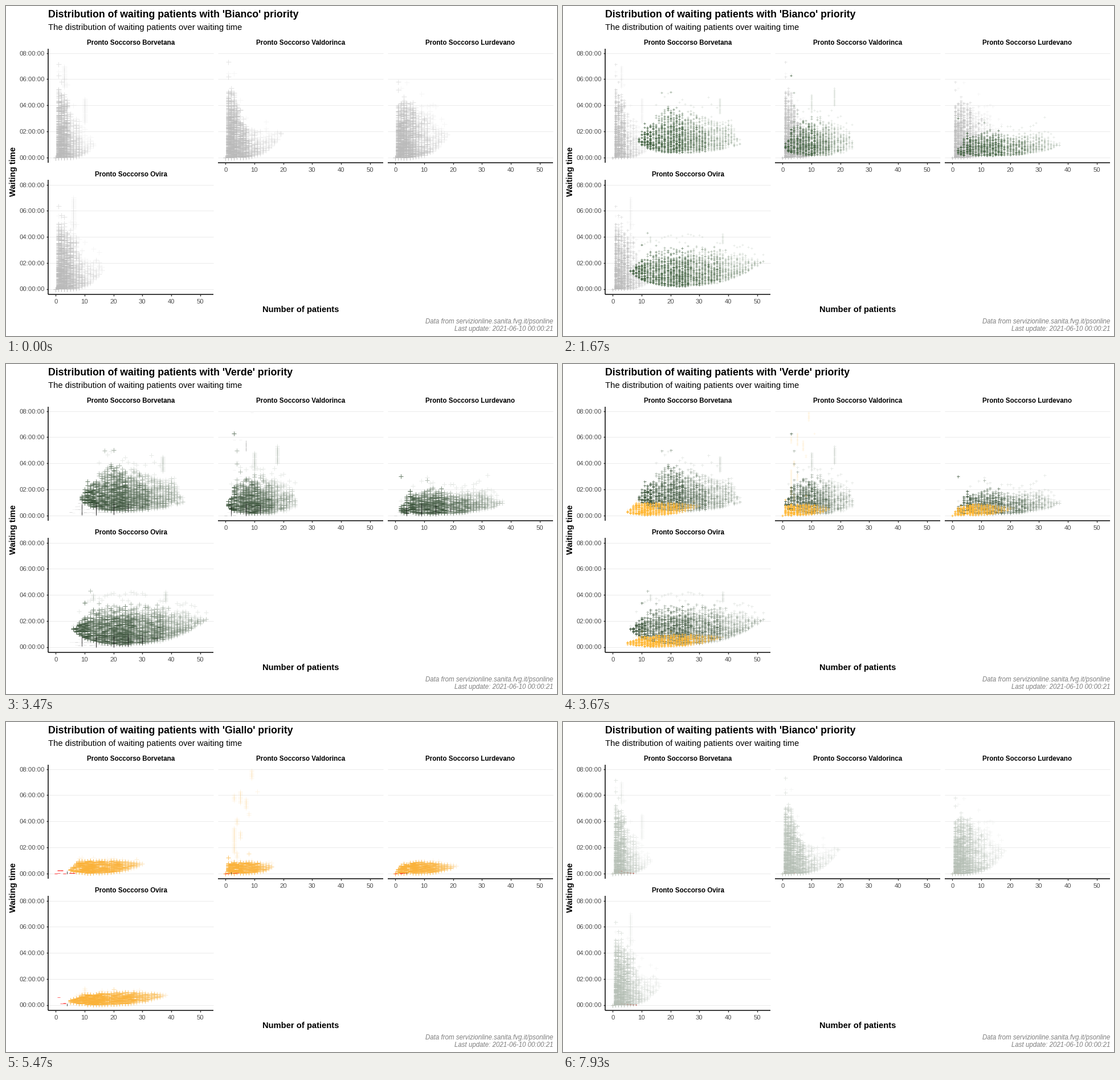
A matplotlib script that plays this animation: 967x579 px, repeating every 8000 ms.

```python
import numpy as np
import matplotlib.pyplot as plt
from matplotlib.animation import FuncAnimation

W, H, DPI = 967, 579, 64
PT = 72 / DPI                     # points per pixel
HOLD, STEPS, LOOP = 21, 9, 8000   # frames at rest, frames of change, ms
CYCLE = HOLD + STEPS

X_UNIT, HOUR = 5.07, 22.87        # pixels per patient, per hour
PANEL_W = 290
ARM = 9                           # full width of a plus
LEVELS = np.array([.12, .22, .4, .75])

# name, left edge, y of 00:00:00, first pixel-aligned column
PANELS = [
    ("Borvetana", 74, 265.7, 4),
    ("Valdorinca", 372, 265.7, 1.8),
    ("Lurdevano", 670, 265.7, 3.8),
    ("Ovira", 74, 496.5, 4),
]


def falling(f):
    return 1 / (1 + (3 * f) ** 2)


def bell(f):
    return np.sin(np.pi * (.08 + .87 * f)) ** .8


def flat(f):
    return 1


# Each cloud: upper edge as (patients, hours); lower edge as (left rise, base,
# right rise); single points (patients, hours) and streaks (patients, from, to).
WHITE = [
    ([(0, 0), (1, 5.6), (3, 5.4), (6, 3.4), (8, 3), (13, 1)], (0, 0, .9),
     [(1, 7.15), (1, 6.3), (2, 5.8), (3, 5.4, 7), (10, 2.7, 4.5)]),
    ([(0, 0), (1, 5.6), (3, 5.4), (5, 3.8), (8, 2.3), (19, 2.3)], (0, 0, 1.7),
     [(1, 7.35), (1, 6.2)]),
    ([(0, 0), (1, 4.4), (3, 5), (8, 4.2), (13, 3.7), (18, 1.8)], (0, 0, 1.7),
     [(1, 5.8), (1, 5.2)]),
    ([(0, 0), (1, 5.4), (7, 4.5), (8, 3.4), (15, 2.4), (16, 1.5)], (0, 0, 1.4),
     [(1, 6.35), (2, 5.65), (3, 5.55), (6, 4.6, 7)]),
]
GREEN = [
    ([(9, 1.7), (11, 2.9), (19, 4.3), (30, 3.6), (41, 3.3), (44, 1.2)], (.8, .3, .7),
     [(17, 4.95), (20, 5), (33, 4.6), (37, 3.4, 4.5)]),
    ([(1, 1.4), (4, 3.4), (13, 3.4), (21, 2.8), (24, 2.1)], (.5, .1, .5),
     [(3, 6.3), (4, 4.95), (4, 3.95), (5, 3.35), (10, 3.5, 4.8), (18, 4, 5.3)]),
    ([(2, 1), (5, 2.2), (11, 2.5), (20, 2), (30, 2.3), (37, 1)], (.1, .1, .8),
     [(2, 3), (11, 2.7), (32, 3.1)]),
    ([(6, 1.5), (8, 2.4), (14, 3.4), (32, 3.6), (45, 3), (52, 2.3)], (1.2, .1, 2),
     [(10, 3.4), (12, 4.3), (13, 3.6, 4), (38, 3.5, 4.2)]),
]
YELLOW = [
    ([(5, .4), (8, 1), (22, 1), (30, .8)], (.2, 0, .7), [(28, 1.1)]),
    ([(0, 0), (1, .85), (10, .9), (16, .7)], (0, 0, .4),
     [(1, 1.2), (4, 1.2, 1.6), (8, 1.5), (3, 1.6, 3.5), (3, 5.6, 6), (4, 3.8, 4.2),
      (5, 2.7, 3.2), (5, 5.4, 6.3), (7, 5, 5.7), (8, 4.5, 4.6), (9, 7.3, 7.9),
      (11, 6.3, 6.3)]),
    ([(0, 0), (2, .7), (8, .95), (15, .8), (21, .6)], (0, 0, .55), []),
    ([(5, .4), (9, .8), (20, 1), (30, 1), (38, .8)], (.2, 0, .75),
     [(10, 1, 1.3), (20, 1.2)]),
]
RED = [
    ([(0, 0), (1, .25), (3, .25), (7, .05)], (0, 0, .02), [(1, .5)]),
    ([(0, 0), (1, .2), (2, .1), (4, .05)], (0, 0, .02), [(1, .42)]),
    ([(0, 0), (1, .15), (2, .1), (4, .05)], (0, 0, .02), [(1, .55), (1, .4), (2, .3)]),
    ([(0, 0), (1, .12), (3, .18), (8, .03)], (0, 0, .02), [(1, .6), (1, .67), (2, .3)]),
]

# name, clouds, colours (rest, entering, leaving),
# density, column weight, beta, alpha, decay, chance of a stray above the edge
STATES = [
    ("Bianco", WHITE, ("#bababa", "#b5bfb5", "#bababa"), 55, falling, (.9, 2), .6, .75, .3),
    ("Verde", GREEN, ("#456f45", "#40603f", "#3c553c"), 26, bell, (1.3, 2.7), .7, .75, .5),
    ("Giallo", YELLOW, ("#f9aa30", "#ffb733", "#fab23a"), 60, bell, (1.2, 1.4), .9, .6, .3),
    ("Rosso", RED, ("#c4160c", "#d8140c", "#c4160c"), 40, flat, (1, 1), .75, 0, 0),
]

rng = np.random.default_rng(7)
fig = plt.figure(figsize=(W / DPI, H / DPI), dpi=DPI, facecolor="white")
ax = fig.add_axes((0, 0, 1, 1))
ax.set_xlim(0, W)
ax.set_ylim(H, 0)
ax.axis("off")


def label(x, y, text, px, **style):
    style = {"va": "baseline", "family": "Liberation Sans", **style}
    return ax.text(x, y, text, fontsize=px * PT, **style)


def stroke(x0, y0, x1, y1, color, width):
    ax.plot([x0, x1], [y0, y1], color=color, lw=width * PT,
            solid_capstyle="butt", zorder=1)


def cloud(spec, density, weight, beta, alpha, decay, stray):
    """Random points between two edges: columns x, hours y, alpha a."""
    upper, (left, base, right), extras = spec
    first, last = upper[0][0], upper[-1][0]
    parts = []

    def add(x, y, a):
        parts.append((np.full(len(y), x), y, np.full(len(y), a)))

    def fade(f):
        return alpha * (1 - decay * f) ** 2

    for x in range(first, last + 1):
        f = (x - first) / (last - first)
        top = np.interp(x, *zip(*upper))
        low = min(top, base + left * (1 - f) ** 8 + right * f ** 4)
        n = int(density * (top - low) * weight(f)) + 2
        add(x, low + (top - low) * rng.beta(*beta, n), fade(f))
        if rng.random() < stray:
            add(x, top * (1 + .2 * rng.random(1)), .12)
    for x, *span in extras:
        if len(span) == 1:
            add(x, np.array(span), fade((x - first) / (last - first)))
        else:
            add(x, np.linspace(*span, int((span[1] - span[0]) / .09) + 1), .12)
    return [np.concatenate(p) for p in zip(*parts)]


def marks(points, marker, alpha, size=ARM):
    line, = ax.plot(points[0], points[1], ls="none", marker=marker, ms=size * PT,
                    mew=PT, alpha=alpha, visible=False)
    return line


class Layer:
    """All points of one priority, drawn at any size from 0 to 1."""

    def __init__(self, clouds, colors, *shape):
        self.colors = colors
        columns = []
        for (_, left, zero, aligned), spec in zip(PANELS, clouds):
            x, y, a = cloud(spec, *shape)
            on_column = (x - aligned + .5) % 5.18 < 1
            columns.append((left + 13.2 + x * X_UNIT, zero - y * HOUR, a, on_column))
        x, y, a, on_column = [np.concatenate(c) for c in zip(*columns)]
        level = np.abs(a[:, None] - LEVELS).argmin(axis=1)
        xy = np.array([x, y])
        self.plus = [marks(xy[:, level == i], "+", v) for i, v in enumerate(LEVELS)]
        # nearly vanished marks survive only where they meet the pixel grid
        on_row = ~on_column & ((y - 265) % 5.3 < 1)
        red = clouds is RED
        self.dots = [marks(xy[:, on_row], "_", .6 if red else .05, 5),
                     marks(xy[:, on_column], "|", .22, 3)]
        self.dots[0].set_color("#ff1010" if red else "black")
        self.dots[1].set_color("black")

    def show(self, size, entering):
        tiny = 0 < size < .15
        color = self.colors[0 if size == 1 else 1 if entering else 2]
        for line in self.plus:
            line.set_visible(size > 0 and not tiny)
            line.set_color(color)
            line.set_markersize(ARM * size * PT)
        for line in self.dots:
            line.set_visible(tiny)
        for line in self.plus + self.dots:
            line.set_zorder(4 if entering else 3)


def draw_panel(name, left, zero):
    right, top, bottom = left + PANEL_W, zero - 191.2, zero + 9
    label((left + right) / 2, zero - 197.5, "Pronto Soccorso " + name, 11.6,
          weight="bold", ha="center")
    for hour in range(0, 9, 2):
        y = zero - hour * HOUR
        stroke(left, y, right, y, "#ebebeb", 1)
        if left == 74:
            stroke(70.5, y, 74, y, "#333333", 1.4)
            label(68, y + 4, f"{hour:02d}:00:00", 11.3, ha="right", color="#4d4d4d")
    if left == 74:
        stroke(74, top, 74, bottom, "black", 1.5)
    if left > 74 or zero > 300:
        stroke(left, bottom, right, bottom, "black", 1.5)
        for n in range(0, 51, 10):
            x = left + 13.2 + n * X_UNIT
            stroke(x, bottom, x, bottom + 3.7, "#333333", 1.4)
            label(x, bottom + 16, str(n), 11.2, ha="center", color="#4d4d4d")


for panel in PANELS:
    draw_panel(*panel[:3])

title = label(74, 19.7, "", 17.7, weight="bold")
label(74, 42, "The distribution of waiting patients over waiting time", 14.7)
label(517, 537.5, "Number of patients", 14.7, weight="bold", ha="center")
label(13, 290, "Waiting time", 14.9, weight="bold", ha="center", va="center", rotation=90)
for y, text in ((557, "Data from servizionline.sanita.fvg.it/psonline"),
                (570, "Last update: 2021-06-10 00:00:21")):
    label(960, y, text, 11.5, ha="right", style="italic", color="#7f7f7f")

layers = [Layer(*state[1:]) for state in STATES]


def update(i):
    now, step = divmod(i, CYCLE)
    after = (now + 1) % len(STATES)
    t = max(0, step - HOLD) / STEPS
    for n, layer in enumerate(layers):
        size = 1 - t if n == now else t if n == after else 0
        layer.show(size, n == after)
    name = STATES[now if t < .5 else after][0]
    title.set_text(f"Distribution of waiting patients with '{name}' priority")
    return [title]


FRAMES = CYCLE * len(STATES)
anim = FuncAnimation(fig, update, frames=FRAMES, interval=LOOP / FRAMES,
                     repeat=True, repeat_delay=0, blit=False)
plt.show()
```
